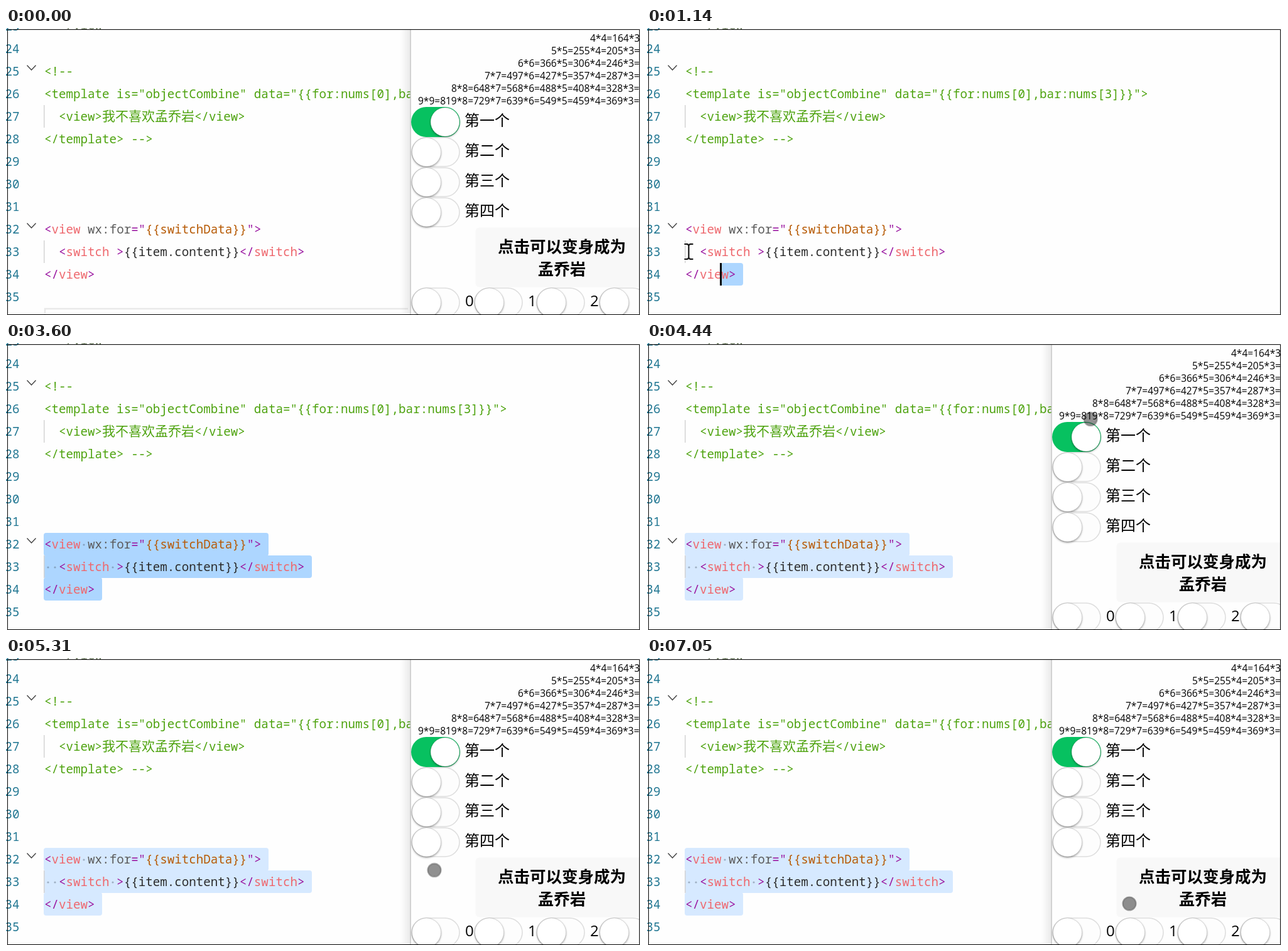
An HTML page for the animation above (8 s loop, 1011 by 458 pixels).

```html
<!DOCTYPE html>
<html lang="zh">
<head>
<meta charset="utf-8">
<title>Switch list</title>
<style>
html, body { margin: 0; width: 100%; height: 100%; overflow: hidden; background: #fefefe; }
svg { display: block; width: 1011px; height: 458px; }
text { white-space: pre; }

.code { font: 19.2px "Noto Sans Mono", "Noto Sans CJK SC", monospace; }
.num { fill: #237893; text-anchor: end; }
.note { fill: #4ea30f; }
.han { font-size: 21px; font-family: "Noto Sans CJK SC", "Noto Sans CJK", sans-serif; }
.p { fill: #9a16a0; }
.t { fill: #ee686e; }
.a { fill: #5c5c5c; }
.s { fill: #b75b06; }
.d { fill: #2c2c2c; }
.guide { fill: #d3d3d3; }
.fold { fill: none; stroke: #3c3c3c; stroke-width: 1.3; }
.dots { fill: rgba(80, 95, 110, .42); }

.table { font: 15.5px "Open Sans", "Noto Sans", sans-serif; }
.label { font: 24px "Open Sans", "Noto Sans CJK SC", "Noto Sans CJK", sans-serif; }
.han-label { font: 24px "Noto Sans CJK SC", "Noto Sans CJK", sans-serif; }
.title { font: bold 25.5px "Noto Sans CJK SC", "Noto Sans CJK", sans-serif; text-anchor: middle; }
.knob { fill: #fff; stroke: #000; stroke-opacity: .14; filter: url(#drop); }

.step { animation: 8s step-end infinite; }
.before { animation-name: before; }
.panel { animation-name: panel; }
.track { animation-name: track; }
.part { animation-name: part; }
.row34 { animation-name: row34; }
.row33 { animation-name: row33; }
.row32 { animation-name: row32; }
.blocks { fill: #add6ff; animation-name: focus; }
.caret { animation-name: caret; }
.tab { animation-name: tab; }
.cursor { animation: path 8s linear infinite; }
.shown { animation-name: shown; }
.touch { animation-name: touch; }
.beam { animation-name: beam; }
.arrow { animation-name: arrow; }

@keyframes before { 0% { opacity: 1 } 10.875%, 100% { opacity: 0 } }
@keyframes panel { 0% { opacity: 1 } 10.875% { opacity: 0 } 49.125%, 100% { opacity: 1 } }
@keyframes track { 0% { fill: #fdfdfd } 49.125%, 100% { fill: #f9f9f9 } }
@keyframes part { 0% { opacity: 0 } 14.25% { opacity: 1 } 14.625%, 100% { opacity: 0 } }
@keyframes row34 { 0% { opacity: 0 } 14.625%, 100% { opacity: 1 } }
@keyframes row33 { 0% { opacity: 0 } 15%, 100% { opacity: 1 } }
@keyframes row32 { 0% { opacity: 0 } 15.375%, 100% { opacity: 1 } }
@keyframes focus { 0% { fill: #add6ff } 49.125%, 100% { fill: #d6e9ff } }
@keyframes caret {
  0% { opacity: 0; transform: translate(60px, 411px) }
  10.875% { opacity: 1; transform: translate(60px, 411px) }
  13.5% { opacity: 1; transform: translate(140px, 375px) }
  14.25% { opacity: 1; transform: translate(116px, 375px) }
  14.625% { opacity: 1; transform: translate(60px, 375px) }
  15% { opacity: 1; transform: translate(60px, 339px) }
  15.375% { opacity: 1; transform: translate(60px, 303px) }
  21.75% { opacity: 0; transform: translate(60px, 303px) }
  27.375% { opacity: 1; transform: translate(60px, 303px) }
  33% { opacity: 0; transform: translate(60px, 303px) }
  39% { opacity: 1; transform: translate(60px, 303px) }
  45%, 100% { opacity: 0; transform: translate(60px, 303px) }
}
@keyframes tab { 0% { opacity: 0 } 22.125% { opacity: 1 } 30%, 100% { opacity: 0 } }

@keyframes path {
  0%, .75% { transform: translate(974px, 56px) }
  1.875% { transform: translate(853px, 103px) }
  3% { transform: translate(712px, 151px) }
  5.25% { transform: translate(470px, 260px) }
  7.5% { transform: translate(300px, 378px) }
  10.5%, 10.875% { transform: translate(233px, 412px) }
  14.25% { transform: translate(67px, 357px) }
  15.375% { transform: translate(16px, 338px) }
  15.75%, 19.125% { transform: translate(12px, 336px) }
  20.625% { transform: translate(430px, 190px) }
  22.125% { transform: translate(905px, -16px) }
  22.126%, 55.5% { transform: translate(706px, 121px) }
  60% { transform: translate(763px, 283px) }
  61.875% { transform: translate(810px, 325px) }
  63.375% { transform: translate(798px, 353px) }
  65.25% { transform: translate(705px, 324px) }
  67.125%, 71.25% { transform: translate(667px, 348px) }
  76.5%, 83.25% { transform: translate(553px, 393px) }
  88.125%, 100% { transform: translate(768px, 392px) }
}
@keyframes shown { 0% { opacity: 0 } .75% { opacity: 1 } 22.125% { opacity: 0 } 55.5%, 100% { opacity: 1 } }
@keyframes touch { 0% { opacity: 1 } 3.62% { opacity: 0 } 55.5% { opacity: 1 } 72.26% { opacity: 0 } 85.34%, 100% { opacity: 1 } }
@keyframes beam { 0% { opacity: 0 } 3.62% { opacity: 1 } 15.07% { opacity: 0 } 19.2% { opacity: 1 } 55.5% { opacity: 0 } 72.26% { opacity: 1 } 85.34%, 100% { opacity: 0 } }
@keyframes arrow { 0% { opacity: 0 } 15.07% { opacity: 1 } 19.2%, 100% { opacity: 0 } }
</style>
</head>
<body>
<svg viewBox="0 0 1011 458">
  <defs>
    <clipPath id="screen"><rect x="643" y="3" width="365" height="454"/></clipPath>
    <linearGradient id="shade">
      <stop offset="0" stop-color="#000" stop-opacity="0"/>
      <stop offset="1" stop-color="#000" stop-opacity=".08"/>
    </linearGradient>
    <filter id="drop" x="-20%" y="-20%" width="140%" height="150%">
      <feDropShadow dx="0" dy="1.5" stdDeviation="1.5" flood-opacity=".4"/>
    </filter>
    <g id="off">
      <rect class="step track" x="1" y="1" width="76" height="46" rx="23" stroke="#dedede" stroke-width="1.6"/>
      <circle class="knob" cx="24.5" cy="24" r="23"/>
    </g>
    <g id="on">
      <rect width="78" height="48" rx="24" fill="#07c160"/>
      <circle class="knob" cx="54" cy="24" r="23"/>
    </g>
  </defs>

  <rect width="1011" height="458" fill="#fefefe"/>
  <path class="step before" d="M640 448H62V458" fill="none" stroke="#e9e9e9" stroke-width="2.5"/>

  <g class="step blocks">
    <rect class="step part" x="117" y="375" width="36" height="36" rx="4"/>
    <rect class="step row32" x="60" y="303" width="358" height="37" rx="4"/>
    <rect class="step row33" x="60" y="339" width="427" height="36" rx="4"/>
    <rect class="step row34" x="60" y="374" width="93" height="37" rx="4"/>
  </g>
  <rect class="guide" x="60" y="123" width="1.5" height="36"/>
  <rect class="guide" x="60" y="339" width="1.5" height="36"/>
  <g class="dots">
    <circle class="step row32" cx="124" cy="322" r="1.6"/>
    <g class="step row33">
      <circle cx="67" cy="358" r="1.6"/><circle cx="78" cy="358" r="1.6"/><circle cx="170" cy="358" r="1.6"/>
    </g>
  </g>

  <g class="code">
    <g id="nums"></g>
    <g class="note">
      <text x="61" y="2" fill="#7d8a72">  &lt;/view&gt; --&gt;</text>
      <text x="61" y="76">&lt;!--</text>
      <text x="61" y="112">&lt;template is="objectCombine" data="{{for:nums[0],bar:nums[3]}}"&gt;</text>
      <text x="84" y="148">&lt;view&gt;<tspan class="han">我不喜欢孟乔岩</tspan>&lt;/view&gt;</text>
      <text x="61" y="184">&lt;/template&gt; --&gt;</text>
    </g>
    <text class="p" x="61" y="328">&lt;<tspan class="t">view</tspan> <tspan class="a">wx:for</tspan>="<tspan class="s">{{switchData}}</tspan>"&gt;</text>
    <text class="p" x="84" y="364">&lt;<tspan class="t">switch</tspan> &gt;<tspan class="d">{{item.content}}</tspan>&lt;/<tspan class="t">switch</tspan>&gt;</text>
    <text class="p" x="61" y="400">&lt;/<tspan class="t">view</tspan>&gt;</text>
  </g>
  <path class="fold" d="M33.5 59.5L40.5 67L47.5 59.5M33.5 311.5L40.5 319L47.5 311.5"/>
  <rect class="step caret" width="3" height="36"/>
  <rect class="step tab" x="871" width="68" height="2" fill="#d9d9d9"/>

  <g class="step panel">
    <rect x="628" y="3" width="16" height="454" fill="url(#shade)"/>
    <g clip-path="url(#screen)">
      <rect x="644" y="3" width="365" height="455" fill="#fefefe"/>
      <rect x="643.5" y="3" width="1.2" height="455" fill="#bdbdbd"/>
      <g class="table" id="table"></g>
      <use href="#on" x="645" y="126"/>
      <use href="#off" x="645" y="174"/>
      <use href="#off" x="645" y="222"/>
      <use href="#off" x="645" y="270"/>
      <g class="han-label">
        <text x="730" y="156">第一个</text>
        <text x="730" y="204">第二个</text>
        <text x="730" y="252">第三个</text>
        <text x="730" y="300">第四个</text>
      </g>
      <rect x="747.5" y="318.5" width="280" height="95" rx="6" fill="#f8f8f8"/>
      <g class="title">
        <text x="885" y="358">点击可以变身成为</text>
        <text x="885" y="394">孟乔岩</text>
      </g>
      <use href="#off" x="645" y="414"/>
      <use href="#off" x="745" y="414"/>
      <use href="#off" x="844" y="414"/>
      <use href="#off" x="944" y="414"/>
      <g class="label">
        <text x="731" y="444">0</text>
        <text x="831" y="444">1</text>
        <text x="930" y="444">2</text>
      </g>
    </g>
  </g>

  <rect x="2.5" y="2.5" width="1006" height="455" fill="none" stroke="#000"/>

  <g class="cursor">
    <g class="step shown">
      <g class="step touch">
        <circle r="10" fill="#000" fill-opacity=".43"/>
        <circle r="10.500" fill="none" stroke="#000" stroke-opacity=".4" stroke-width="2"/>
      </g>
      <g class="step beam" fill="none">
        <path d="M-7 -12H-2L0 -10L2 -12H7M0 -10V10M-7 12H-2L0 10L2 12H7" stroke="#fff" stroke-width="4"/>
        <path d="M-7 -12H-2L0 -10L2 -12H7M0 -10V10M-7 12H-2L0 10L2 12H7" stroke="#000" stroke-width="2"/>
      </g>
      <path class="step arrow" d="M8 -13V10L3 5.5L-1 13L-4.5 11L-1 4H-8Z" fill="#fff" stroke="#000" stroke-width="1.2"/>
    </g>
  </g>
</svg>
<script>
const addText = (parent, x, y, value, name = "") => {
  const el = document.createElementNS("http://www.w3.org/2000/svg", "text");
  el.setAttribute("x", x);
  el.setAttribute("y", y);
  el.setAttribute("class", name);
  el.textContent = value;
  document.getElementById(parent).append(el);
};

for (let n = 23; n <= 35; n++) addText("nums", 21.5, 40 + 36 * (n - 24), n, "num");

for (let n = 4; n <= 9; n++) {
  let row = "";
  for (let k = n; k > 0; k--) row += `${n}*${k}=${n * k}`;
  addText("table", n === 4 ? 930 : 868 - 53 * (n - 5), 21.5 + 20 * (n - 4), row);
}
</script>
</body>
</html>
```
